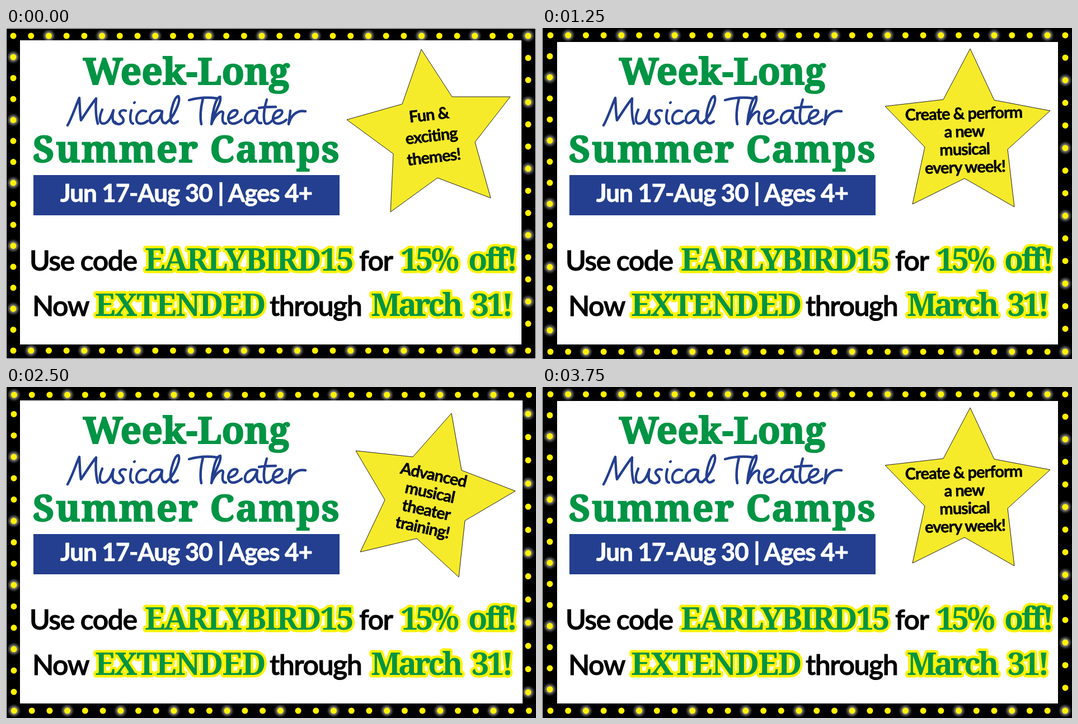
Recreate the animation shown at these times as an HTML page without scripts. Size 947 px wide and 592 px high, loop 5 s.

```html
<!DOCTYPE html>
<html lang="en">
<head>
<meta charset="utf-8">
<title>Summer Camps</title>
<style>
  html, body { margin: 0; width: 100%; height: 100%; overflow: hidden; background: #fff; }
  svg { display: block; width: 100vw; height: 100vh; }

  .scene { animation: 5s step-end infinite; }
  .fun { animation-name: fun; --left: 37.5; --right: 39.6; }
  .create { animation-name: create; opacity: 0; --left: 37.7; --right: 40.4; }
  .train { animation-name: train; opacity: 0; --left: 38.2; --right: 41.5; }
  @keyframes fun { 0% { opacity: 1 } 25%, 100% { opacity: 0 } }
  @keyframes create { 0% { opacity: 0 } 25% { opacity: 1 } 50% { opacity: 0 } 75%, 100% { opacity: 1 } }
  @keyframes train { 0% { opacity: 0 } 50% { opacity: 1 } 75%, 100% { opacity: 0 } }

  /* Every third bulb around the frame is lit. */
  .bulbs, .glow { fill: none; stroke-linecap: round; }
  .bulbs { stroke: #fff200; stroke-width: 11; --step: 1px; }
  .glow { stroke: #d8d8d0; stroke-width: 18; opacity: .6; filter: blur(2px); --step: 3px; }
  .h { stroke-dasharray: .01px calc(31.71 * var(--step)); }
  .l { stroke-dasharray: .01px calc(var(--left) * var(--step)); }
  .r { stroke-dasharray: .01px calc(var(--right) * var(--step)); }

  .star { fill: #f5eb2a; stroke: #231f20; stroke-width: 1; }
  text { font-family: Lato, "Open Sans", sans-serif; font-weight: 700; }
  .note text { font-size: 29px; letter-spacing: -1px; text-anchor: middle; stroke: #000; stroke-width: .5; }
  .slab { font-family: "Noto Serif", serif; font-size: 66px; fill: #009444; stroke: #009444; stroke-width: 2; }
  .dates { font-size: 44px; letter-spacing: -1.1px; fill: #fff; stroke: #fff; stroke-width: .8; text-anchor: middle; }
  .plain { font-size: 50px; font-weight: 600; letter-spacing: -1.5px; stroke: #000; stroke-width: .9; }
  .code { font-family: "Noto Serif", serif; font-size: 56px; fill: #009444; stroke: #fff200;
    stroke-width: 9; stroke-linejoin: round; paint-order: stroke; word-spacing: 10px; }
  .script { fill: none; stroke: #243f8f; stroke-width: 4.4; stroke-linecap: round; stroke-linejoin: round; }
</style>
</head>
<body>
<svg viewBox="0 0 947 592" preserveAspectRatio="none">
  <defs>
    <path id="a" d="M279 149C266 144 256 155 257 165C259 175 272 170 279 150C277 162 278 171 286 170"/>
    <path id="e" d="M398 162C412 160 418 148 410 147C400 147 394 160 399 168C404 174 415 170 421 164"/>
  </defs>

  <g class="scene fun">
    <path d="M1 1H946V591H1Z"/>
    <path fill="#fff" d="M25 22H921V566H25Z"/>
    <g class="glow">
      <path class="h" d="M76.4 14H940M44.7 577H940"/>
      <path class="l" d="M13 52V545"/>
      <path class="r" d="M933 132.7V545"/>
    </g>
    <g class="bulbs">
      <path class="h" d="M13 14H940M13 577H940"/>
      <path class="l" d="M13 52V545"/>
      <path class="r" d="M933 53.5V545"/>
    </g>
    <path class="star" d="M742 38L797 123L901 123L838 204L866 304L771 268L687 329L692 225L609 164L708 136Z"/>
    <g class="note" transform="translate(761 203) rotate(-6.5)">
      <text y="-38">Fun &amp;</text>
      <text>exciting</text>
      <text y="38">themes!</text>
    </g>
  </g>

  <g class="scene create">
    <path d="M1 0H947V592H1Z"/>
    <path fill="#fff" d="M27 25H922V566H27Z"/>
    <g class="glow">
      <path class="h" d="M46.7 13H942M78.4 579H942"/>
      <path class="l" d="M14 88.2V550"/>
      <path class="r" d="M935 93.4V550"/>
    </g>
    <g class="bulbs">
      <path class="h" d="M15 13H942M15 579H942"/>
      <path class="l" d="M14 50.5V550"/>
      <path class="r" d="M935 53V550"/>
    </g>
    <path class="star" d="M765 37L808 129L908 148L832 217L844 320L755 269L662 315L684 213L613 140L717 128Z"/>
    <g class="note" transform="translate(755 211) rotate(-1.5)">
      <text y="-48">Create &amp; perform</text>
      <text y="-16">a new</text>
      <text y="16">musical</text>
      <text y="48">every week!</text>
    </g>
  </g>

  <g class="scene train">
    <path d="M1 0H947V592H1Z"/>
    <path fill="#fff" d="M25 24H923V566H25Z"/>
    <g class="glow">
      <path class="h" d="M14.5 14H942M14.5 579H942"/>
      <path class="l" d="M14 124.9V550"/>
      <path class="r" d="M933 48V550"/>
    </g>
    <g class="bulbs">
      <path class="h" d="M14.5 14H942M14.5 579H942"/>
      <path class="l" d="M14 48.5V550"/>
      <path class="r" d="M933 48V550"/>
    </g>
    <path class="star" d="M796 47L814 149L910 186L820 239L809 340L734 271L633 295L677 202L625 114L727 125Z"/>
    <g class="note" transform="translate(752 214) rotate(12)">
      <text y="-48">Advanced</text>
      <text y="-16">musical</text>
      <text y="16">theater</text>
      <text y="48">training!</text>
    </g>
  </g>

  <text class="slab" x="138" y="101">Week-Long</text>
  <g class="script" role="img" aria-label="Musical Theater">
    <path d="M110 174C118 160 125 138 131 125C132 140 132 155 134 165C143 152 151 138 161 126C160 142 160 158 164 171"/>
    <path d="M172 146C166 160 166 171 174 171C183 171 188 158 192 147C189 160 190 170 197 171"/>
    <path d="M214 148C206 145 200 151 205 157C212 163 212 170 202 172C198 172 196 170 195 168"/>
    <path d="M224 147C221 158 221 170 227 171M229 134l1-1"/>
    <path d="M250 149C240 144 232 155 233 164C234 173 245 173 253 166"/>
    <use href="#a"/>
    <path d="M286 170C300 160 313 130 308 122C301 122 293 150 294 163C295 171 300 173 307 167"/>
    <path d="M327 129C345 124 365 124 378 126M352 126C348 142 346 158 349 172"/>
    <path d="M367 171C372 150 385 135 383 123C374 124 368 155 367 172C373 155 388 143 388 153C386 163 386 171 393 171"/>
    <use href="#e"/>
    <use href="#a" x="170"/>
    <path d="M466 128C461 145 459 162 463 170C466 173 472 170 476 165M452 143C462 141 474 141 482 141"/>
    <use href="#e" x="80"/>
    <path d="M508 148C507 157 506 165 505 172C509 157 519 146 535 149"/>
  </g>
  <text class="slab" x="48" y="240" letter-spacing="2">Summer Camps</text>

  <path fill="#243f8f" d="M49 263H596V335H49Z"/>
  <text class="dates" x="322" y="311">Jun 17-Aug 30 | Ages 4+</text>

  <text class="plain" x="42" y="434">Use code</text>
  <text class="code" x="248" y="434" letter-spacing="-2.2">EARLYBIRD15</text>
  <text class="plain" x="631" y="434">for</text>
  <text class="code" x="705" y="434" letter-spacing="-4.2">15% off!</text>
  <text class="plain" x="47" y="515">Now</text>
  <text class="code" x="159" y="515" letter-spacing="-1.7">EXTENDED</text>
  <text class="plain" x="471" y="515">through</text>
  <text class="code" x="652" y="515" letter-spacing="-4.6">March 31!</text>
</svg>
</body>
</html>
```
